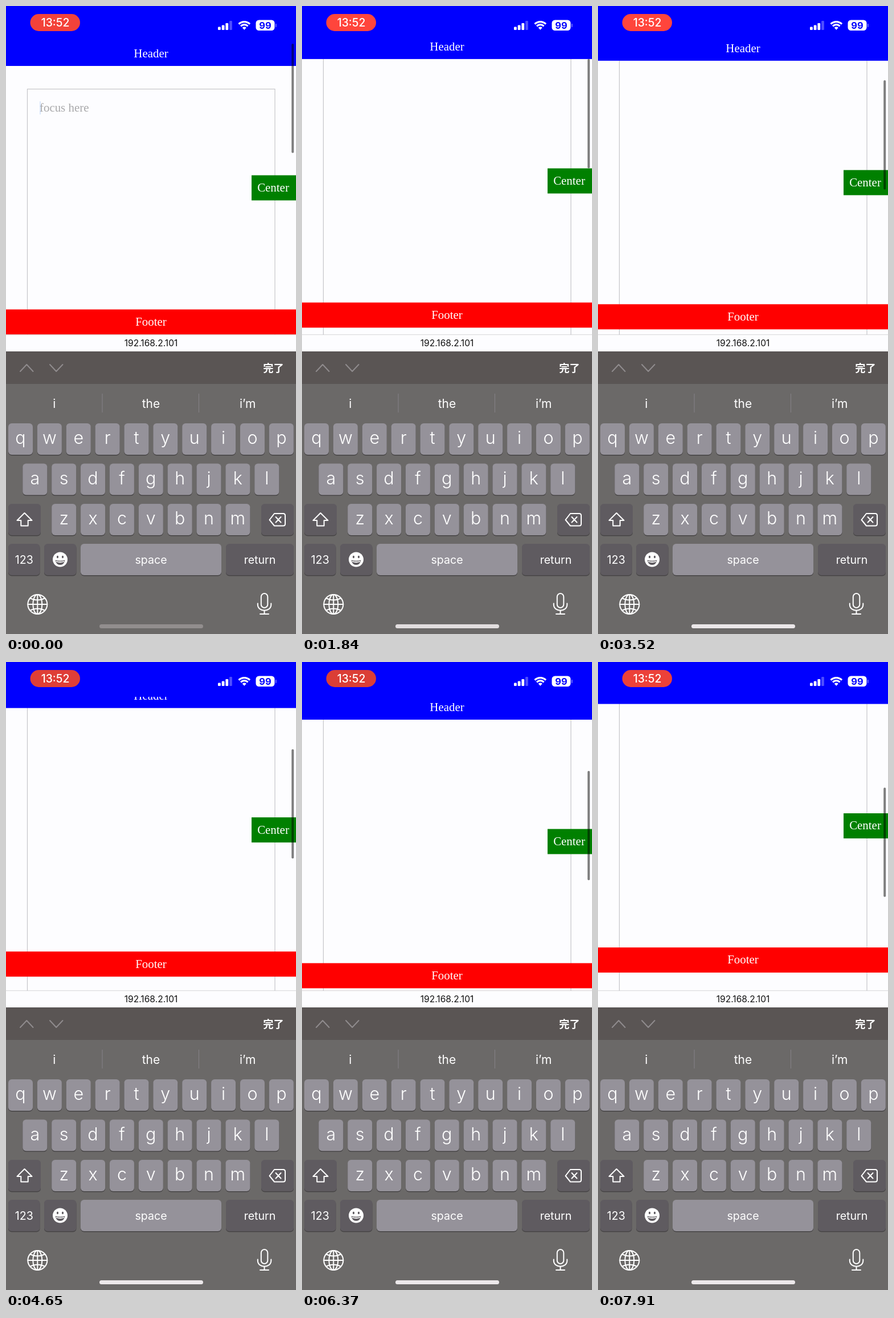
An HTML page with a canvas that plays this animation: 509 px wide and 1100 px high, repeating every 8000 ms.

```html
<!DOCTYPE html>
<html lang="en">
<head>
<meta charset="utf-8">
<title>Fixed elements while scrolling</title>
<style>
html, body { margin: 0; width: 100%; height: 100%; overflow: hidden; background: #fdfdff; }
canvas { display: block; width: 509px; height: 1100px; }
</style>
</head>
<body>
<canvas id="stage" width="509" height="1100"></canvas>
<script>
const W = 509, H = 1100, LOOP = 8000;
const ctx = document.getElementById('stage').getContext('2d');
const SERIF = '20.9px "Liberation Serif", serif';
const sans = (size, weight = 400) => `${weight} ${size}px Inter, sans-serif`;

// time, scroll position, speed
const PATH = [
  [900, 0, 0],
  [1380, 60, 0.2],
  [2540, 288, 0.112],
  [3520, 384, 0.109],
  [5630, 666, 0.167],
  [7210, 816, 0.108],
  [7910, 924, 0.234]
];

function scrollAt(t) {
  if (t <= PATH[0][0]) return 0;
  const i = PATH.findIndex(p => p[0] > t);
  if (i < 0) return PATH[PATH.length - 1][1];
  const [t0, s0, v0] = PATH[i - 1], [t1, s1, v1] = PATH[i];
  const h = t1 - t0, u = (t - t0) / h, u2 = u * u, u3 = u2 * u;
  return s0 * (2 * u3 - 3 * u2 + 1) + s1 * (3 * u2 - 2 * u3)
    + h * (v0 * (u3 - 2 * u2 + u) + v1 * (u3 - u2));
}

// Fixed elements drift with the page until the next correction.
function driftAt(t) {
  const now = Math.min(t, 7910), step = 206, base = 2405;
  const last = base + Math.floor((now - base) / step) * step;
  return scrollAt(now) - (last < 1400 ? 0 : scrollAt(last));
}

function mix(a, b, k) {
  return `rgb(${a.map((v, i) => Math.round(v + (b[i] - v) * k)).join()})`;
}

function rect(x, y, w, h, color) {
  ctx.fillStyle = color;
  ctx.fillRect(x, y, w, h);
}

function round(x, y, w, h, r, color) {
  ctx.fillStyle = color;
  ctx.beginPath();
  ctx.roundRect(x, y, w, h, r);
  ctx.fill();
}

function text(str, x, y, font, color = '#fff', align = 'center') {
  ctx.font = font;
  ctx.fillStyle = color;
  ctx.textAlign = align;
  ctx.fillText(str, x, y);
}

function line(d, color = '#fff', width = 2) {
  ctx.strokeStyle = color;
  ctx.lineWidth = width;
  ctx.lineCap = ctx.lineJoin = 'round';
  ctx.stroke(new Path2D(d));
}

function drawPage(t) {
  const s = scrollAt(t), d = driftAt(t);
  ctx.save();
  ctx.beginPath();
  ctx.rect(0, 0, W, 576);
  ctx.clip();

  ctx.strokeStyle = '#c6c6c8';
  ctx.lineWidth = 1.2;
  ctx.strokeRect(37.5, 145.5 - s, 434.5, 2400);
  text('focus here', 59, 185 - s, SERIF, '#a9a9ab', 'left');
  ctx.globalAlpha = 0.58 - 0.36 * Math.cos(t / 920 * 2 * Math.PI);
  rect(59, 167 - s, 2, 23, '#609cf0');
  ctx.globalAlpha = 1;

  rect(0, -d, W, 105, '#00f');
  text('Header', 254.5, 90 - d, SERIF);
  rect(431, 296.5 - d, 78, 44, '#008000');
  text('Center', 469, 325 - d, SERIF);
  rect(0, 531.5 - d, W, 44, '#f00');
  text('Footer', 254.5, 560 - d, SERIF);
  round(501.2, 66 + s / 6, 4, 191.5, 2, 'rgba(0,0,0,.5)');
  ctx.restore();

  rect(0, 575.4, W, 1, '#c8c8ca');
  rect(0, 576.4, W, 29, '#fdfdff');
  text('192.168.2.101', 254.5, 596, sans(15.6), '#111');
}

function drawStatus(t) {
  rect(0, 0, W, 61, '#00f');
  const glow = 0.5 + 0.5 * Math.cos(2 * Math.PI * ((t - 830) / 838 - 0.2));
  round(42.5, 14, 87.5, 30, 15, mix([216, 61, 54], [255, 69, 60], glow));
  text('13:52', 86.5, 36.3, sans(19.4, 500));

  for (let i = 0; i < 4; i++) {
    const h = [5.5, 8.5, 12, 16][i];
    round(372 + i * 6.7, 42 - h, 4.8, h, 1.2, i < 3 ? '#fff' : 'rgba(255,255,255,.3)');
  }

  ctx.strokeStyle = '#fff';
  ctx.lineWidth = 3.2;
  ctx.lineCap = 'butt';
  for (const r of [8.8, 13.8]) {
    ctx.beginPath();
    ctx.arc(418.3, 41.5, r, -Math.PI * 0.75, -Math.PI * 0.25);
    ctx.stroke();
  }
  ctx.fillStyle = '#fff';
  ctx.beginPath();
  ctx.moveTo(418.3, 41.8);
  ctx.arc(418.3, 41.5, 5, -Math.PI * 0.75, -Math.PI * 0.25);
  ctx.fill();

  round(438.5, 24.5, 33, 18.5, 5.5, '#fff');
  round(472.8, 31, 2, 6, 1, 'rgba(255,255,255,.4)');
  text('99', 455, 40, sans(16.5, 700), '#00f');
}

function key(x, y, w, label, font, dark) {
  round(x, y + 1.5, w, 55, 6, '#464445');
  round(x, y, w, 55, 6, dark ? '#5f5b60' : '#95929a');
  if (label) text(label, x + w / 2, y + (label.length > 1 ? 35 : 36), font);
}

function drawIcons() {
  line('M25 640 L36.3 628 L47.5 640 M77 628 L88.2 640 L99.5 628', '#8f8b8d');
  line('M32.5 888 L45.5 901 H38.7 V910.5 H26.3 V901 H19.5 Z');
  line('M471 889 H486.5 Q490 889 490 892.5 V907 Q490 910.5 486.5 910.5 H471 L462.5 900 Z M473.5 895 L482.5 904.5 M482.5 895 L473.5 904.5');

  // smiling face
  ctx.fillStyle = '#fff';
  ctx.beginPath();
  ctx.arc(95, 969.5, 13, 0, 7);
  ctx.fill();
  ctx.fillStyle = '#5f5b60';
  for (const x of [90.5, 99.5]) {
    ctx.beginPath();
    ctx.ellipse(x, 965, 1.6, 2.2, 0, 0, 7);
    ctx.fill();
  }
  ctx.fill(new Path2D('M86.5 970.5 Q95 973 103.5 970.5 Q102 979 95 979 Q88 979 86.5 970.5 Z'));
  line('M88.5 973 Q95 975 101.5 973', '#fff', 1.8);

  // globe
  ctx.strokeStyle = '#fff';
  ctx.lineWidth = 2;
  for (const rx of [17, 8]) {
    ctx.beginPath();
    ctx.ellipse(55.3, 1048, rx, 17, 0, 0, 7);
    ctx.stroke();
  }
  line('M55.3 1031 V1065 M38.3 1048 H72.3 M42.5 1037.5 Q55.3 1043.5 68 1037.5 M42.5 1058.5 Q55.3 1052.5 68 1058.5');

  // microphone
  ctx.beginPath();
  ctx.roundRect(447.8, 1029, 11.5, 25, 5.75);
  ctx.stroke();
  line('M441.8 1046.5 V1048.5 C441.8 1062 465.3 1062 465.3 1048.5 V1046.5 M453.5 1058.5 V1065 M446 1065 H461');
}

function drawKeyboard(t) {
  rect(0, 605, W, 495, '#6b6968');
  rect(0, 605, W, 57, '#5a5554');
  text('完了', 469.5, 641, '600 18.2px "Noto Sans CJK SC", "Noto Sans CJK JP", "Noto Sans CJK", sans-serif');

  rect(168.5, 679, 1, 33, '#858287');
  rect(338, 679, 1, 33, '#858287');
  ['i', 'the', 'i’m'].forEach((w, i) => text(w, 84.8 + i * 169.7, 703.5, sans(21)));

  const letter = sans(30.5, 300), small = sans(19.6), pitch = 50.87;
  [['qwertyuiop', 4], ['asdfghjkl', 29.3], ['zxcvbnm', 80.2]].forEach(([row, x], r) => {
    [...row].forEach((c, i) => key(x + i * pitch, 731 + r * 70.5, 43, c, letter));
  });
  key(4, 872, 57, '', small, true);
  key(448, 872, 57, '', small, true);
  key(4, 942, 55.5, '123', small, true);
  key(67, 942, 56.5, '', small, true);
  key(131, 942, 247, 'space', small);
  key(386, 942, 119, 'return', small, true);
  drawIcons();

  const k = 1 - Math.exp(-t / 850);
  round(164, 1083, 182, 7, 3.5, mix([146, 142, 142], [236, 232, 234], k));
}

function frame(now) {
  const t = now % LOOP;
  rect(0, 0, W, H, '#fdfdff');
  drawPage(t);
  drawStatus(t);
  drawKeyboard(t);
  requestAnimationFrame(frame);
}
requestAnimationFrame(frame);
</script>
</body>
</html>
```
